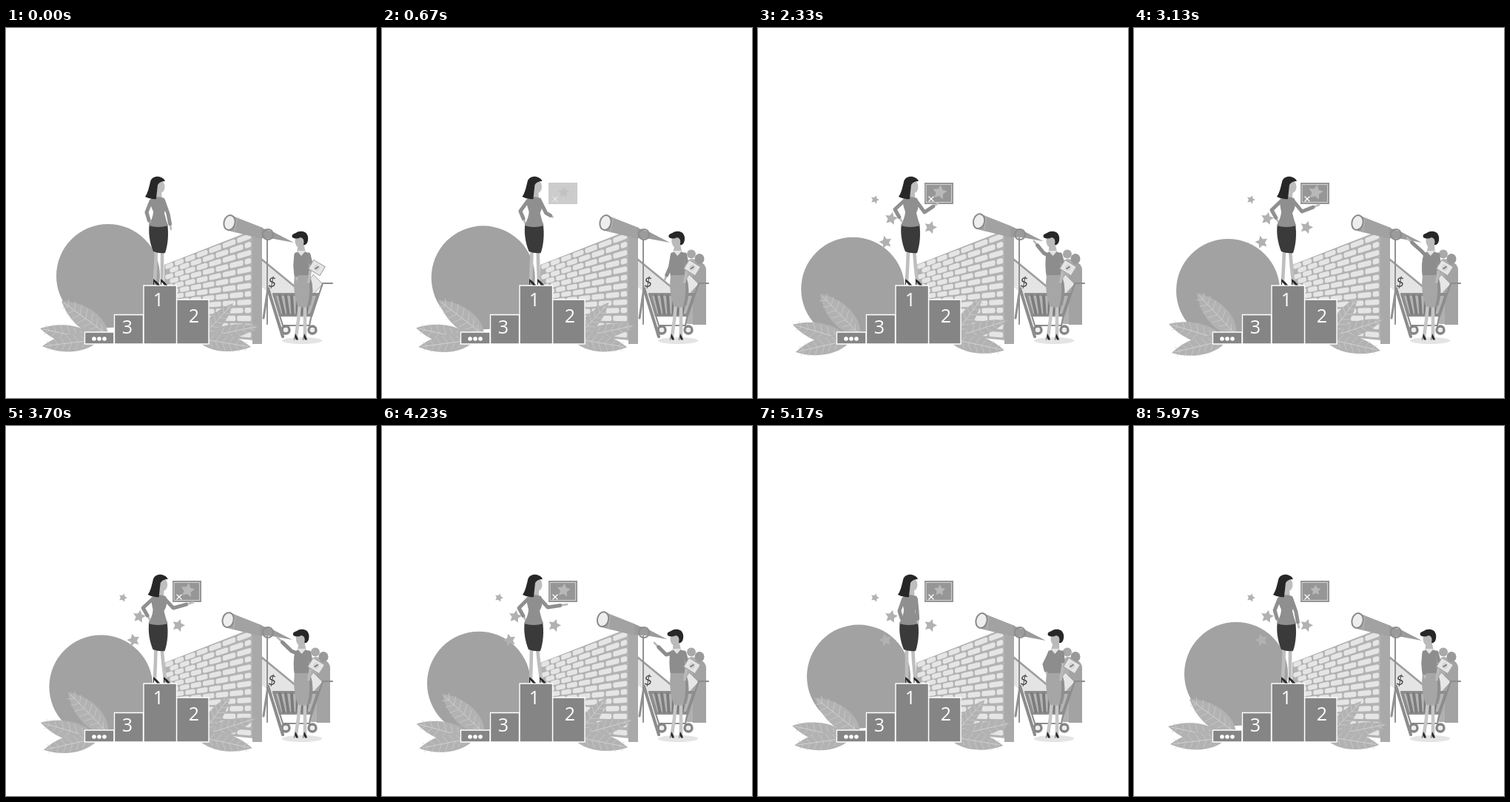
An HTML page with a canvas that plays this animation: 500x500 px, repeating every 6000 ms.

```html
<!DOCTYPE html>
<html lang="en">
<head>
<meta charset="utf-8">
<title>Podium and telescope</title>
<style>
html, body { margin: 0; width: 100%; height: 100%; overflow: hidden; background: #fff; }
canvas { display: block; width: 500px; height: 500px; }
</style>
</head>
<body>
<canvas id="stage" width="500" height="500"></canvas>
<script>
const LOOP = 6000;
const ctx = document.getElementById('stage').getContext('2d');
const TAU = Math.PI * 2;
const mix = (a, b, k) => a + (b - a) * k;
const clamp = k => Math.max(0, Math.min(1, k));

// Pose rows share these times; the last row wraps to the first.
const TIMES = [0, 1370, 2330, 3130, 4230, 5170];
// head x, hip x, front elbow, front hand, back elbow, back hand
const WINNER = [
  [0, 0, 219, 251, 223, 272, 190, 249, 195, 266],
  [3, -1, 224, 249, 238, 237, 184, 246, 192, 260],
  [2, 0, 225, 249, 243, 237, 185, 245, 194, 261],
  [5, 0, 227, 248, 250, 239, 186, 246, 195, 262],
  [2, -1, 224, 245, 250, 241, 185, 246, 194, 262],
  [1, -2, 215, 250, 216, 266, 191, 250, 196, 266]
];
// head x, elbow, hand, banknote x
const SHOPPER = [
  [0, 391, 322, 393, 340, 1],
  [2, 387, 322, 371, 332, 0],
  [-1, 386, 304, 373, 288, 0],
  [4, 388, 301, 369, 284, 1],
  [-1, 384, 309, 368, 293, 0],
  [5, 387, 322, 390, 334, 5]
];

// Periodic cubic through the pose rows.
function pose(rows, t) {
  const n = TIMES.length;
  const timeAt = i => TIMES[(i + n) % n] + Math.floor(i / n) * LOOP;
  const rowAt = i => rows[(i + n) % n];
  let i = n - 1;
  while (TIMES[i] > t) i--;
  const span = timeAt(i + 1) - timeAt(i), s = (t - timeAt(i)) / span;
  const ease = s * s * (3 - 2 * s);
  const slope = (j, c) =>
    (rowAt(j + 1)[c] - rowAt(j - 1)[c]) / (timeAt(j + 1) - timeAt(j - 1)) * span;
  return rowAt(i).map((v, c) => mix(v, rowAt(i + 1)[c], ease)
    + slope(i, c) * s * (1 - s) * (1 - s) - slope(i + 1, c) * s * s * (1 - s));
}

function trace(points, close) {
  ctx.beginPath();
  for (let i = 0; i < points.length; i += 2) ctx.lineTo(points[i], points[i + 1]);
  if (close) ctx.closePath();
}
function poly(points, fill, stroke, width = 1) {
  trace(points, true);
  ctx.fillStyle = fill;
  ctx.fill();
  if (stroke) {
    ctx.strokeStyle = stroke;
    ctx.lineWidth = width;
    ctx.stroke();
  }
}
function line(points, color, width) {
  trace(points, false);
  ctx.strokeStyle = color;
  ctx.lineWidth = width;
  ctx.stroke();
}
function shape(d, fill) {
  ctx.fillStyle = fill;
  ctx.fill(new Path2D(d));
}
function oval(x, y, rx, ry, fill, stroke, width = 1, turn = 0) {
  ctx.beginPath();
  ctx.ellipse(x, y, rx, ry, turn, 0, TAU);
  if (fill) { ctx.fillStyle = fill; ctx.fill(); }
  if (stroke) { ctx.strokeStyle = stroke; ctx.lineWidth = width; ctx.stroke(); }
}
function moved(x, y, draw) {
  ctx.save();
  ctx.translate(x, y);
  draw();
  ctx.restore();
}
function faded(alpha, draw) {
  if (alpha <= 0) return;
  ctx.save();
  ctx.globalAlpha = alpha;
  draw();
  ctx.restore();
}
const appear = (t, start, time = 250) => clamp((t - start) / time);

function star(x, y, r, color, turn = 0) {
  const pts = [];
  for (let i = 0; i < 10; i++) {
    const a = turn - Math.PI / 2 + i * Math.PI / 5, d = i % 2 ? r * 0.5 : r;
    pts.push(x + Math.cos(a) * d, y + Math.sin(a) * d);
  }
  poly(pts, color);
}

function leaf(bx, by, tx, ty, bulge) {
  const len = Math.hypot(tx - bx, ty - by);
  ctx.save();
  ctx.translate(bx, by);
  ctx.rotate(Math.atan2(ty - by, tx - bx));
  shape(`M0 0C${len * .2} ${-bulge} ${len * .65} ${-bulge} ${len} 0C${len * .65} ${bulge} ${len * .2} ${bulge} 0 0`, '#b2b2b2');
  line([0, 0, len * .94, 0], '#d2d2d2', 0.9);
  for (let k = 0.12; k < 0.86; k += 0.12) {
    const h = bulge * 2.4 * k * (1 - k) + 0.8;
    line([len * k + 6, -h, len * k, 0, len * k + 6, h], '#cccccc', 0.7);
  }
  ctx.restore();
}

function leaves(side, k) {
  if (side < 0) {
    leaf(124, 423, mix(46, 47, k), mix(406, 400, k), 17);
    leaf(126, 421, mix(49, 51, k), mix(430, 439, k), 16);
    leaf(138, 415, mix(75, 85, k), mix(369, 358, k), 19);
  } else {
    leaf(262, 419, mix(342, 337, k), mix(403, 394, k), 13);
    leaf(256, 419, mix(331, 333, k), mix(431, 436, k), 16);
    leaf(261, 421, mix(307, 302, k), mix(372, 364, k), 13);
  }
}

function wall() {
  poly([214, 320, 334, 273, 334, 422, 214, 410], '#b2b2b2');
  const rows = 13, cols = 7;
  const px = u => 214 + 118 * u * (0.72 + 0.28 * u);
  const py = (x, v) => mix(320 - (x - 214) * 0.39, 408 + (x - 214) * 0.1, v);
  ctx.save();
  trace([214, 320, 332, 274, 332, 422, 214, 410], true);
  ctx.clip();
  for (let r = 0; r < rows; r++) {
    for (let c = 0; c <= cols; c++) {
      const shift = r % 2 ? 0.5 : 0;
      const a = px(Math.max(0, (c - shift) / cols)) + 3.4;
      const b = px(Math.min(1, (c + 1 - shift) / cols)) - 3;
      if (b - a < 1) continue;
      const top = (r + 0.44) / rows, low = (r + 0.7) / rows;
      poly([a, py(a, top), b, py(b, top), b, py(b, low), a, py(a, low)],
        '#e5e5e5', '#e5e5e5', 4.4);
    }
  }
  ctx.restore();
  poly([333, 273, 346, 269, 346, 427, 333, 427], '#a9a9a9');
}

function block(x, y, w, label, middle, base) {
  ctx.fillStyle = '#858585';
  ctx.fillRect(x, y, w, 427 - y);
  ctx.strokeStyle = '#fff';
  ctx.lineWidth = 1.4;
  ctx.strokeRect(x, y, w, 427 - y);
  ctx.fillStyle = '#fff';
  ctx.font = '25px "Open Sans", "Noto Sans", sans-serif';
  ctx.textAlign = 'center';
  ctx.fillText(label, middle, base);
}
function podium() {
  block(106.5, 411, 39.5, '', 0, 0);
  block(146.5, 387.5, 39, '3', 164, 413);
  block(230.5, 367, 43.5, '2', 254, 398);
  block(186, 348, 44.5, '1', 206, 376);
  for (const x of [119, 126, 133]) oval(x, 420, 2.8, 2.8, '#fff');
}

function card(k) {
  ctx.fillStyle = '#969696';
  ctx.fillRect(225, 209, 39, 29);
  ctx.strokeStyle = '#d0d0d0';
  ctx.lineWidth = 1;
  ctx.strokeRect(227.5, 211.5, 34, 24);
  star(245.5, 222, mix(7.5, 10.5, k), '#b8b8b8', mix(0, 0.2, k));
  line([231, 228, 237, 234], '#fff', 1.2);
  line([237, 228, 231, 234], '#fff', 1.2);
}

function arm(sx, sy, ex, ey, hx, hy, sleeve, skin, width) {
  const cut = 0.65, wx = mix(ex, hx, cut), wy = mix(ey, hy, cut);
  line([wx, wy, hx, hy], skin, width - 2.2);
  line([sx, sy, ex, ey, wx, wy], sleeve, width);
}

function winner(t, k) {
  const [head, hip, ex, ey, hx, hy, bx, by, gx, gy] = pose(WINNER, t);
  const top = head * 0.5;
  const skin = '#bebebe', coat = '#8f8f8f';
  const feet = [201, 211 + 4 * Math.min(1, k * 2)];
  feet.forEach((foot, i) => {
    const thigh = 203 + i * 8 + hip;
    line([thigh, 300, mix(thigh, foot, .45), 322, foot, 342], skin, 4.6);
    shape(`M${foot - 2} 339L${foot + 2} 342Q${foot + 6} 346 ${foot + 7} 347.5H${foot + 3}L${foot - 1} 343V347H${foot - 2}Z`, '#292929');
  });
  arm(196 + top, 234, bx, by, gx, gy, coat, skin, 5);
  moved(hip, 0, () =>
    shape('M194 264H218C220 278 219 292 215 304Q207 305 199 302C194 290 192 276 194 264Z', '#3a3a3a'));
  poly([204 + head, 220, 210 + head, 220, 211 + top, 232, 203 + top, 232], skin);
  const L = 195 + top, R = 214 + top, h = 206 + hip;
  shape(`M${L} 231Q${204 + top} 226 ${R} 230Q${R + 4} 240 ${h + 8} 250Q${h + 10} 259 ${h + 13} 267Q${h} 271 ${h - 13} 267Q${h - 7} 255 ${h - 7} 248Q${L - 1} 238 ${L} 231`, coat);
  arm(213 + top, 234, ex, ey, hx, hy, coat, skin, 5);
  moved(head, 0, () => {
    oval(208.5, 214.5, 6, 8.5, skin);
    shape('M215 207C212 199 197 198 195 208C193 217 191 224 188 228Q195 232 203 231Q204 221 205 212Q208 207 215 207Z', '#272727');
  });
}

function telescope(t) {
  const wave = t > 1300 && t < 5100 ? Math.sin((t - 1300) / 1900 * Math.PI) ** 2 : 0;
  line([353, 284, 353, 400], '#919191', 2);
  line([354, 352, 348, 392], '#919191', 3);
  line([354, 352, 374, 417], '#8c8c8c', 4.2);
  moved(-3.5 * wave, -1.8 * wave, () => {
    poly([304, 253, 347, 270, 346, 285, 301, 274], '#a2a2a2');
    poly([345, 270, 362, 276, 389, 290, 362, 285, 345, 284], '#9b9b9b');
    oval(302, 263, 7.5, 10, '#eeeeee', '#8a8a8a', 2, 0.25);
    line([312, 257, 309, 276], '#b8b8b8', 1);
  });
  oval(354, 279, 7, 7, null, '#8d8d8d', 2);
}

function crowd() {
  shape('M412 325Q412 312 419 312Q427 312 427 325V400H412Z', '#b0b0b0');
  oval(418, 305.5, 6, 6, '#a9a9a9');
  shape('M420 328Q421 317 430 317Q438 318 438 328V401H420Z', '#a3a3a3');
  oval(429, 312, 6.5, 7, '#999');
}

function note(x, y, w, h, turn) {
  ctx.save();
  ctx.translate(x, y);
  ctx.rotate(turn);
  ctx.fillStyle = '#e5e5e5';
  ctx.fillRect(-w / 2, -h / 2, w, h);
  ctx.strokeStyle = '#a2a2a2';
  ctx.lineWidth = 1;
  ctx.strokeRect(-w / 2, -h / 2, w, h);
  oval(0, 0, 4, 4, '#d4d4d4');
  line([1, -2, -1, 2], '#777', 1.7);
  ctx.restore();
}

function cart() {
  poly([346, 314, 397, 356, 365, 367, 346, 350], '#e4e4e4');
  line([346, 313, 397, 355], '#9c9c9c', 2.5);
  ctx.fillStyle = '#444';
  ctx.font = 'italic 18px Lato, "Open Sans", sans-serif';
  ctx.textAlign = 'center';
  ctx.fillText('$', 359.5, 350);
  line([441, 345, 428, 345, 412, 392, 410, 402, 374, 402, 361, 360], '#8d8d8d', 2.2);
  poly([360, 358, 424, 358, 414, 390, 369, 390], '#8d8d8d');
  poly([365, 362, 419, 362, 411, 386, 372, 386], '#b4b4b4');
  for (let x = 370; x < 417; x += 8)
    line([x, 362, mix(x, 392, .25), 386], '#7c7c7c', 4);
  for (const x of [378, 414]) oval(x, 408, 5, 5, '#eee', '#858585', 3.4);
}

function shopper(t) {
  const [head, ex, ey, hx, hy, bill] = pose(SHOPPER, t);
  const top = head * 0.45, skin = '#bababa', dress = '#8d8d8d';
  oval(400, 422.5, 27, 4.5, '#e4e4e4');
  for (const [thigh, foot] of [[397, 392], [404, 404]]) {
    line([thigh, 372, mix(thigh, foot, .4), 395, foot, 416], '#c6c6c6', 4.6);
    shape(`M${foot - 1} 413L${foot + 2} 418L${foot + 3} 421.5H${foot}L${foot - 2} 418V421.5H${foot - 3}Z`, '#303030');
  }
  poly([395 + head, 290, 402 + head, 290, 405 + top, 304, 393 + top, 304], skin);
  const L = 390 + top, R = 409 + top;
  shape(`M${L} 304Q${400 + top} 300 ${R} 304Q${R + 3} 318 410 337H390Q387 320 ${L} 304`, dress);
  shape('M390 334H410Q417 350 412 375Q403 380 394 376Q387 353 390 334Z', '#a6a6a6');
  shape('M408 335H411Q418 355 411 375L407 377Q413 354 408 335Z', '#8f8f8f');
  poly([393 + top, 301, 405 + top, 301, 399 + top, 308], '#e3e3e3');
  line([409 + top, 307, 412, 324, 409, 343], skin, 3.6);
  line([409 + top, 306, 412, 318], dress, 5);
  arm(392 + top, 307, ex, ey, hx, hy, dress, skin, 5);
  note(419 + bill, 324, 18, 14, 0.55);
  moved(head, 0, () => {
    oval(397, 288, 6.5, 9, skin);
    shape('M387 283C385 278 391 278 393 276C399 273 407 275 408 282C409 289 406 294 402 293Q404 284 398 283Q392 286 387 283Z', '#272727');
  });
}

function draw(t) {
  const k = (1 - Math.cos(t / LOOP * TAU)) / 2;
  ctx.fillStyle = '#fff';
  ctx.fillRect(0, 0, 500, 500);
  ctx.lineCap = ctx.lineJoin = 'round';
  oval(mix(138, 127, k), mix(335, 355, k), 70, 70, '#a2a2a2');
  wall();
  leaves(-1, k);
  leaves(1, k);
  podium();
  faded(appear(t, 550), () => card(k));
  faded(appear(t, 700), () => star(158, 232, 6, '#b1b1b1', 0.3));
  faded(appear(t, 1250, 260), () => star(180, 257.5, 9, '#b1b1b1', 0.2));
  faded(appear(t, 1000), () => star(172.5, 289.5, 9, '#b1b1b1', -0.25));
  faded(appear(t, 850), () => star(233, 269.5, 9, '#b1b1b1', 0.3));
  winner(t, k);
  faded(appear(t, 300), crowd);
  poly([415, 333, 428, 346, 415, 360, 406, 347], '#e6e6e6', '#a2a2a2');
  cart();
  telescope(t);
  shopper(t);
}

const start = performance.now();
function tick() {
  draw((performance.now() - start) % LOOP);
  requestAnimationFrame(tick);
}
tick();
</script>
</body>
</html>
```
